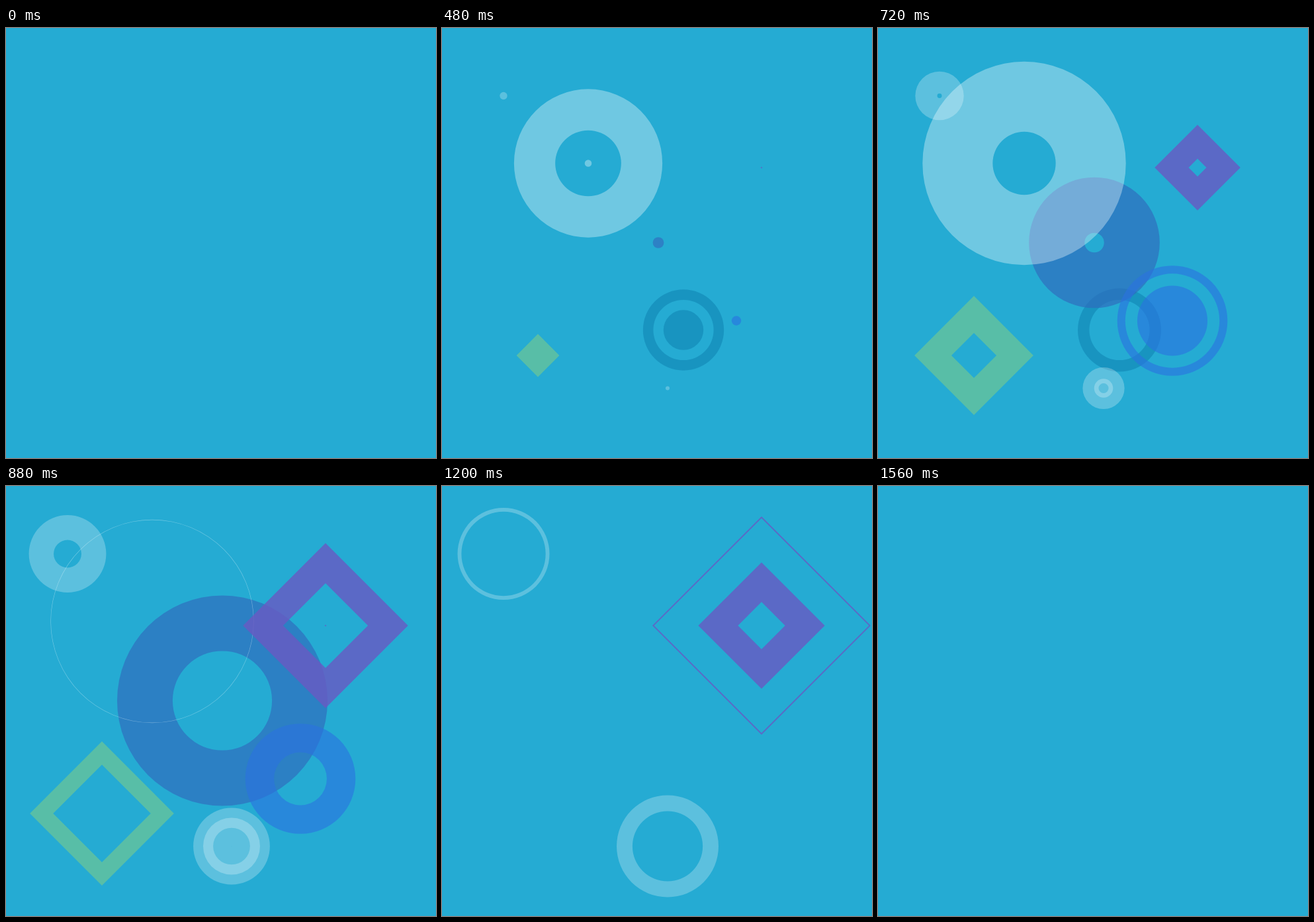
An HTML page with a canvas for the animation above (1.92 s loop, 650 by 650 pixels).

```html
<!DOCTYPE html>
<html lang="en">
<head>
<meta charset="utf-8">
<title>Ripples</title>
<style>
  html, body { margin: 0; width: 100%; height: 100%; overflow: hidden; background: #25abd3; }
  canvas { display: block; width: 650px; height: 650px; }
</style>
</head>
<body>
<canvas id="stage" width="650" height="650"></canvas>
<script>
const ctx = document.getElementById('stage').getContext('2d');
const LOOP = 1920, STEP = 40, END = 1560;
const white = alpha => `rgba(255,255,255,${alpha})`;

// A pulse grows from the centre; after a gap its hole grows the same way.
const pulse = (start, time, gap, holeTime = time) => ({ start, time, gap, holeTime });
const quickTwin = start => [pulse(start, 292, 71), pulse(start + 120, 292, 191)];
const slowTwin = start => [0, 400].map(delay => pulse(start + delay, 640, 162));

const circle = (x, y, r) => {
  ctx.moveTo(x + r, y);
  ctx.arc(x, y, r, 0, 2 * Math.PI);
  ctx.closePath();
};

const diamond = (x, y, r) => {
  ctx.moveTo(x, y - r);
  ctx.lineTo(x + r, y);
  ctx.lineTo(x, y + r);
  ctx.lineTo(x - r, y);
  ctx.closePath();
};

const ripple = (path, x, y, r, fill, ...pulses) => ({ path, x, y, r, fill, pulses });

const ripples = [
  ripple(circle, 365, 456.5, 63, 'rgba(13,127,173,.5)', ...quickTwin(218)),
  ripple(diamond, 145, 495, 109, 'rgba(122,204,139,.6)', pulse(247, 645, 233)),
  ripple(circle, 341, 544.5, 77, white(.25), pulse(610, 400, 252, 537)),
  ripple(circle, 341, 544.5, 43, white(.25), pulse(402, 480, 190)),
  ripple(circle, 327, 324.5, 173.5, 'rgba(49,106,189,.65)', pulse(403, 580, 213)),
  ripple(circle, 221, 204.5, 153.7, white(.34), pulse(243, 360, 100), pulse(450, 270, 170)),
  ripple(circle, 445, 442.5, 83.3, 'rgba(42,114,226,.6)', ...quickTwin(427)),
  ripple(circle, 93, 102.5, 69.5, white(.25), pulse(357, 700, 268)),
  ripple(diamond, 483, 211, 165, 'rgba(106,89,196,.8)', ...slowTwin(446))
];

function ease(t, start, time) {
  const x = Math.min(1, Math.max(0, (t - start) / time));
  return x * x * (3 - 2 * x);
}

function drawRipple({ path, x, y, r, fill, pulses }, t) {
  ctx.beginPath();
  for (const { start, time, gap, holeTime } of pulses) {
    const outer = r * ease(t, start, time);
    const hole = r * ease(t, start + gap, holeTime);
    if (outer > hole) {
      path(x, y, outer);
      if (hole > 0) path(x, y, hole);
    }
  }
  ctx.fillStyle = fill;
  ctx.fill('evenodd');
}

function tick() {
  const t = Math.floor(performance.now() % LOOP / STEP) * STEP;
  ctx.fillStyle = '#25abd3';
  ctx.fillRect(0, 0, 650, 650);
  if (t < END) for (const item of ripples) drawRipple(item, t);
  requestAnimationFrame(tick);
}
tick();
</script>
</body>
</html>
```
